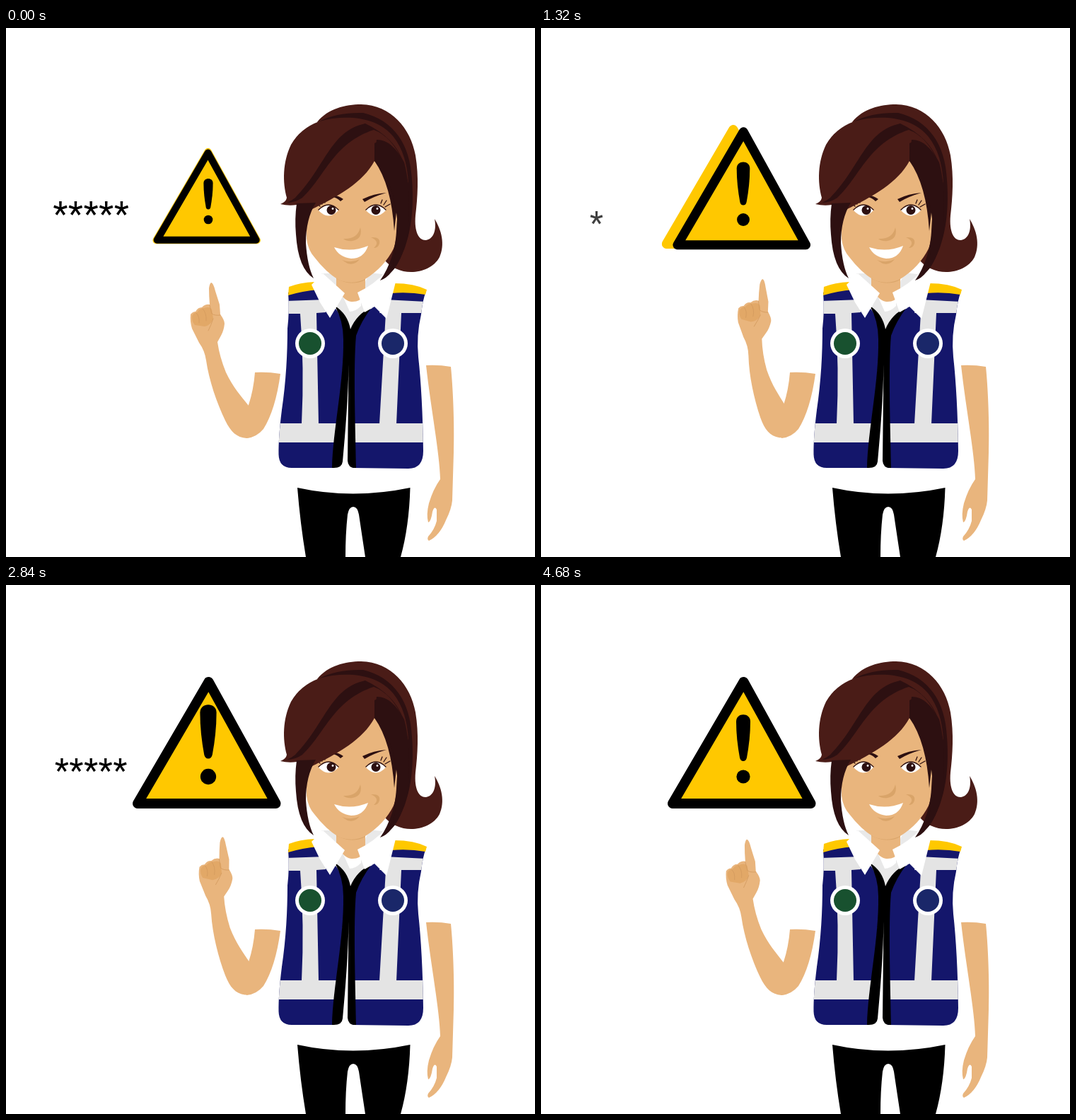
An HTML page with a canvas that plays this animation: 748x748 px, repeating every 4.76 s.

```html
<!DOCTYPE html>
<html lang="en">
<head>
<meta charset="utf-8">
<title>Safety warning</title>
<style>
html, body { margin: 0; width: 100%; height: 100%; overflow: hidden; background: #fff; }
canvas { display: block; width: 748px; height: 748px; }
</style>
</head>
<body>
<canvas id="stage" width="748" height="748"></canvas>
<script>
const ctx = document.getElementById('stage').getContext('2d');
const LOOP = 4760, STEP = 40;
const SKIN = '#e9b57d', SHADE = '#d9a469', HAIR = '#4a1c17', DARK = '#2d1011';
const BLUE = '#14166b', GREY = '#e4e4e4', YELLOW = '#ffc800';

const clamp = v => Math.max(0, Math.min(1, v));
const smooth = v => v * v * (3 - 2 * v);

// Monotone cubic through [time, value] keys: flat at the extremes.
function curve(...keys) {
  const n = keys.length;
  const slope = i => (keys[i + 1][1] - keys[i][1]) / (keys[i + 1][0] - keys[i][0]);
  const tangent = keys.map((_, i) => {
    if (i === 0 || i === n - 1) return 0;
    const a = slope(i - 1), b = slope(i);
    return a * b <= 0 ? 0 : 2 * a * b / (a + b);
  });
  return t => {
    if (t <= keys[0][0]) return keys[0][1];
    if (t >= keys[n - 1][0]) return keys[n - 1][1];
    let i = 0;
    while (t >= keys[i + 1][0]) i++;
    const [t0, v0] = keys[i], [t1, v1] = keys[i + 1];
    const d = t1 - t0, u = (t - t0) / d;
    return v0 + (v1 - v0) * smooth(u) + d * u * (1 - u) * ((1 - u) * tangent[i] - u * tangent[i + 1]);
  };
}

const frameScale = curve([0, .716], [640, 1.052], [800, 1.043], [1120, .995], [1340, .928], [2000, .985], [2240, 1]);
const panelScale = curve([0, .728], [500, 1.075], [800, .9], [1320, .94], [1680, 1], [2000, 1.147], [2120, 1.27], [2240, 1], [2600, .98]);
const panelX = curve([0, 0], [500, -3], [800, -9], [1320, -14.5], [2000, -9.5], [2120, 3], [2240, 0]);
const panelY = curve([800, 0], [1320, -1.7], [2000, 3.5], [2240, 0]);
const markScale = curve([0, .66], [800, .83], [1320, .93], [2000, 1.18], [2840, 1.16], [3100, 1.18], [3400, 1.155], [3520, 1.16], [3920, 1.216], [4480, 1.08], [4680, 1]);
const armSwing = curve([0, 0], [400, -37], [800, -4], [1170, 30], [1320, 23], [1840, -37], [2000, -25], [2600, 30], [2840, 16], [3290, -38], [3520, -22], [4150, 30], [4680, 1], [4760, 0]);

function fill(color, d) {
  ctx.fillStyle = color;
  ctx.fill(new Path2D(d));
}
function line(color, width, d) {
  ctx.strokeStyle = color;
  ctx.lineWidth = width;
  ctx.lineCap = ctx.lineJoin = 'round';
  ctx.stroke(new Path2D(d));
}
function disc(color, x, y, r) {
  ctx.fillStyle = color;
  ctx.beginPath();
  ctx.arc(x, y, r, 0, 7);
  ctx.fill();
}
function group(draw) {
  ctx.save();
  draw();
  ctx.restore();
}
function scaleAt(x, y, s) {
  ctx.translate(x, y);
  ctx.scale(s, s);
  ctx.translate(-x, -y);
}

const TRIANGLE = 'M286.5 137 L186 309 H381.5 Z';

function drawSign(t) {
  group(() => {
    ctx.translate(panelX(t), panelY(t));
    scaleAt(283.5, 276.3, panelScale(t));
    fill(YELLOW, TRIANGLE);
    line(YELLOW, 14, TRIANGLE);
  });
  ctx.fillStyle = '#fff';
  ctx.beginPath();
  ctx.roundRect(50, 236, 140, 39, 7);
  ctx.fill();
  group(() => {
    scaleAt(283.5, 276.3, frameScale(t));
    line('#000', 14, TRIANGLE);
  });
  group(() => {
    scaleAt(286, 271, markScale(t));
    fill('#000', 'M276 193 C276 180 296 180 296 193 C296 211 294 228 291 244 Q290 249 286 249 Q282 249 281 244 C278 228 276 211 276 193 Z');
    disc('#000', 286, 271, 9.6);
  });
}

// 0 = letter in place, 1 = letter gone
function hiddenAmount(t, i) {
  const progress = (start, order) => smooth(clamp((t - start - order * 115) / 120));
  if (t < 1700) return progress(800, 4 - i);
  if (t < 3000) return 1 - progress(2020, i);
  return progress(3460, 4 - i);
}

function drawStars(t) {
  group(() => {
    const pulse = t < 630 ? .16 * Math.sin(Math.PI * (t + 70) / 700) : 0;
    scaleAt(120, 255, 1 + pulse);
    ctx.font = '400 46px Roboto, sans-serif';
    ctx.fillStyle = '#000';
    const box = ctx.measureText('*');
    const dx = (box.actualBoundingBoxLeft - box.actualBoundingBoxRight) / 2;
    const dy = (box.actualBoundingBoxAscent - box.actualBoundingBoxDescent) / 2;
    for (let i = 0; i < 5; i++) {
      const h = hiddenAmount(t, i);
      if (h >= 1) continue;
      group(() => {
        ctx.globalAlpha = 1 - h * h;
        ctx.translate(0, 28 * h);
        scaleAt(69, 255, 1 - .09 * h);
        ctx.fillText('*', 79 + 20.6 * i + dx, 255 + dy);
      });
    }
  });
}

function drawRaisedArm(t) {
  fill(SKIN, 'M352 487 Q370 486 388 489 Q381 540 364 567 Q354 579 340 580 L328 560 L343 533 Q350 512 352 487 Z');
  group(() => {
    ctx.translate(345, 555);
    ctx.rotate(armSwing(t) / 196);
    ctx.translate(-345, -555);
    fill(SKIN, `M290 360 Q293 360 296 372 L302 391 L303 405 Q309 413 309 418 Q308 428 304 435 L299 444
      Q302 465 311 487 C321 508 332 520 343 534 L366 551 Q362 578 340 580
      C326 579 318 571 310 555 C298 530 287 498 283 470 Q281 456 273 445
      L263 425 Q260 415 261 405 Q264 401 268 401 Q271 395 277 395 Q282 390 288 391 Q287 379 287 368 Q288 361 290 360 Z`);
    fill('#e2a867', 'M263 407 Q266 402 270 402 Q274 396 280 396 Q288 393 291 398 L293 411 Q290 420 281 422 L267 420 Q262 414 263 407 Z');
    line('#d39a5e', .8, 'M269 403 Q274 407 273 417 M278 397 Q284 403 283 414 M288 392 L291 404 Q295 407 303 406 M286 428 Q290 420 293 411');
  });
}

function drawBody() {
  fill(SKIN, `M594 477 Q612 476 629 479 C633 520 634 570 633 600 L631 668 Q630 680 622 696 Q613 718 598 725
    Q595 723 597 719 Q606 709 609 697 L609 681 Q606 675 603 684 Q601 698 597 699 Q594 688 598 672 Q604 652 614 638
    C613 600 601 540 594 477 Z`);
  fill('#000', 'M412 650 Q490 667 571.500 650 Q570 705 558 748 H508 Q503 715 499 688 Q497 677 491 677 Q485 677 483 688 Q480 715 480 748 H424 Q416 700 412 650 Z');

  const vest = new Path2D(`M399 374 L439 369 L466 397 Q480 412 478 460 L464 622 H404 Q386 622 385.500 603 Q385 580 390 540
    C396 500 398 460 398 425 Q401 400 399 374 Z M548 368 L594 372 Q589 385 587 405 Q580 435 583 465 Q589 520 590 598
    Q590 623 569 623 L490 622 V424 L512 396 Z`);
  group(() => {
    ctx.clip(vest);
    ctx.fillStyle = BLUE;
    ctx.fillRect(380, 350, 220, 280);
    fill(GREY, 'M396 386 L452 384 V402 L439 403 L442 560 H418 Q422 480 416 404 H396 Z');
    fill(GREY, 'M535 384 L595 387 V403 H559 L552 560 H528 L537 403 H528 Z');
    ctx.fillRect(380, 559, 220, 27);
  });
  fill(YELLOW, 'M399 378 L400 366 Q415 360 437 359 L441 370 Q419 372 399 378 Z');
  fill(YELLOW, 'M549 361 Q577 361 595 370 L593 377 Q570 373 545 375 Z');
  fill('#e8e8e8', 'M478 372 H500 L518 396 Q494 408 487 428 Q481 405 467 396 Z');
  fill('#000', `M465 393 Q483 404 487 426 Q496 404 517 395 Q502 415 495 435 C491 480 494 560 495 622 Q484 623 483 612
    L484.500 475 C484 520 480 570 476 613 Q475 623 461 622 C462 570 478 500 477 440 Q477 414 465 393 Z`);
  fill('#fff', 'M474 374 H502 V393 Q494 401 486 401 Z');

  disc('#fff', 430, 446, 21);
  disc('#18512f', 430, 446, 16);
  disc('#fff', 547, 446, 21);
  disc('#1a2769', 547, 446, 16);
}

function drawNeck() {
  fill(SKIN, 'M466 345 H508 V377 Q500 388 488 387 Q475 385 466 363 Z');
  fill(SHADE, 'M466 350 H508 V356 Q489 366 466 354 Z');
  fill('#e9e9e9', 'M446 347 H467 V365 L458 360 Z M514 346 L541 349 L520 367 L508 376 V359 Z');
  fill('#fff', 'M432 363 L448 347 L479 375 L458 410 L444 388 Z M497 374 Q522 362 536 345 L551 359 L538 411 L521 394 L507 402 Z');
}

function drawEye(x) {
  fill('#fff', `M${x - 14} 258 Q${x} 243 ${x + 14} 258 Q${x} 273 ${x - 14} 258 Z`);
  line(DARK, 1.4, `M${x - 14} 257 Q${x} 243 ${x + 14} 257`);
  disc(DARK, x + (x < 490 ? 4 : 0), 257.5, 6.5);
  disc('#fff', x + (x < 490 ? 6 : 2), 255.5, 1.4);
}

function drawHead() {
  fill(HAIR, `M440 133 C455 114 480 108 502 108 C545 109 572 142 579 180 C584 210 582 240 579 265
    C577 289 584 300 593 300 C605 299 609 285 606 270 C616 286 621 306 613 324 C604 341 581 348 562 344
    C546 340 537 332 533 324 L520 200 Z`);
  fill(SKIN, `M425 255 L425 298 Q427 314 436 324 Q452 345 470 356 Q490 364 508 355
    Q535 338 548 312 Q554 298 554 250 L522 180 L430 230 Z`);

  // features sit under the fringe
  drawEye(456);
  drawEye(523);
  line(DARK, 1.3, 'M444 252 L438 247 M447 249 L442 243 M451 247 L447 242 M530 248 L532 243 M534 250 L538 244 M536 253 L543 249');
  fill(DARK, 'M462 236 Q470 237 477 242 L473 245 Q468 240 462 239 Z M504 242 Q520 234 538 233 Q520 238 507 246 Z');
  fill(SHADE, 'M501 282 Q505 298 490 301 Q482 302 477 298 Q497 299 501 282 Z');
  fill(SHADE, 'M516 296 Q530 295 528 305 Q526 311 520 311 Q530 302 516 296 Z');
  fill(SHADE, 'M475 328 Q488 333 500 327 Q493 336 483 333 Z');
  fill('#fff', 'M464 310 Q488 318 512 308 Q506 326 488 326 Q471 324 464 310 Z');

  fill(DARK, `M443 132 Q468 119 505 120 C548 130 572 165 574 215 C578 265 570 315 545 345 Q538 354 529 357
    C543 338 551 310 552 288 L555 235 Q552 260 549 287 Q545 222 521 188 L480 140 Z`);
  fill(HAIR, `M443 132 C480 122 525 125 548 154 Q567 178 569 220 Q560 185 540 168 Q530 156 521 163
    L521 188 C505 218 470 238 431 257 L411 250 Q400 252 388 249 Q396 246 397 240 C391 218 391 190 403 165 Q416 142 443 132 Z`);
  fill(DARK, `M508 135 C458 146 452 196 409 240 Q403 245 397 247 Q409 247 419 240
    C450 212 462 163 520 144 Q545 153 562 190 Q550 155 508 135 Z`);
  fill(DARK, 'M521 188 L524 158 Q545 157 563 190 Q573 225 568 292 Q559 332 545 345 Q553 320 553 270 Q548 215 521 188 Z');
  fill(DARK, 'M411 248 L438 247 Q424 270 424 304 Q426 336 435 354 Q413 340 410 292 Q408 270 411 248 Z');
}

function render(now) {
  const t = Math.floor((now % LOOP) / STEP) * STEP;
  ctx.fillStyle = '#fff';
  ctx.fillRect(0, 0, 748, 748);
  drawSign(t);
  drawStars(t);
  drawRaisedArm(t);
  drawBody();
  drawNeck();
  drawHead();
}

let start;
function tick(now) {
  start ??= now;
  render(now - start);
  requestAnimationFrame(tick);
}
render(0);
requestAnimationFrame(tick);
</script>
</body>
</html>
```
